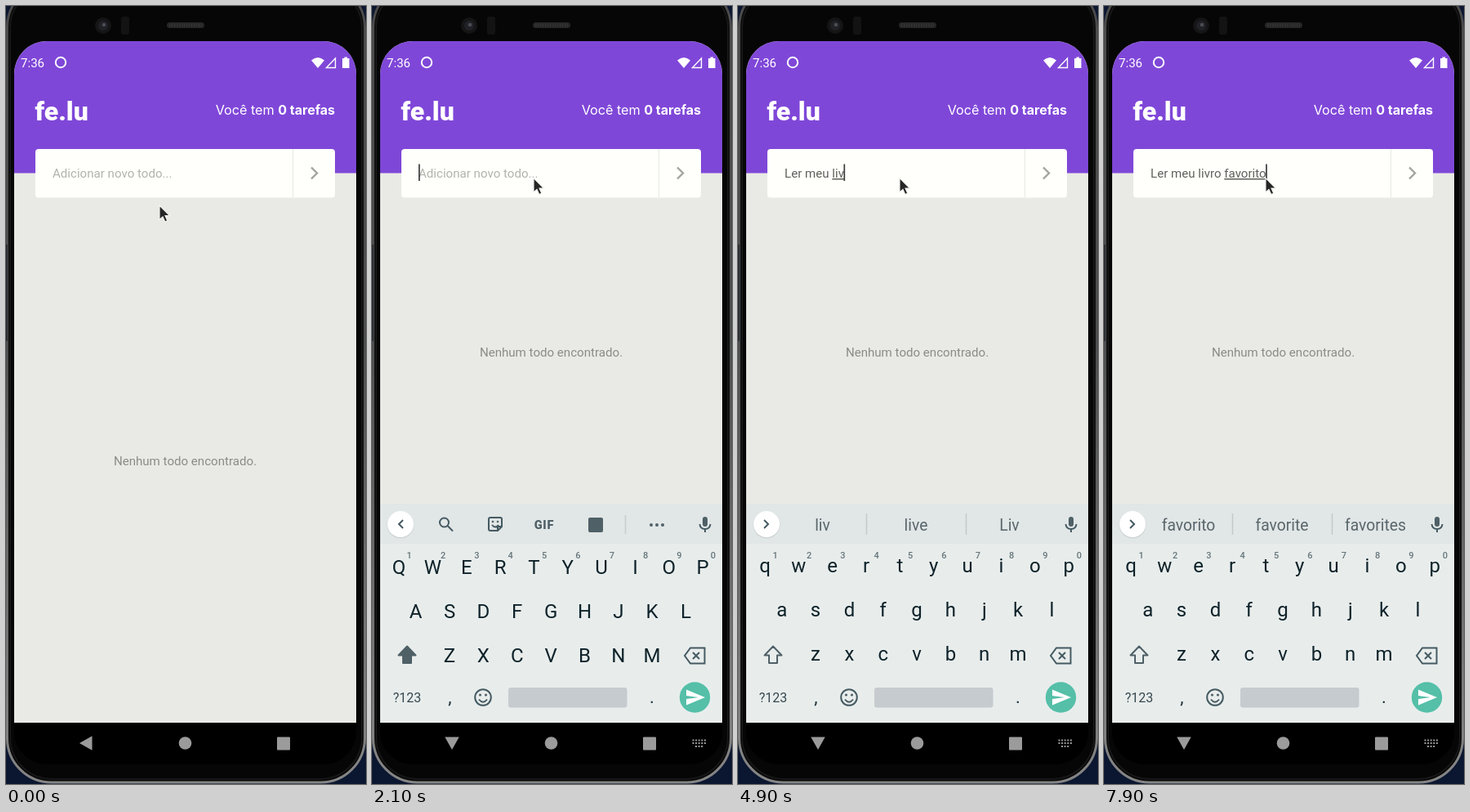
Recreate the animation shown at these times as an HTML page. Size 441 by 952 pixels, loop 8000 ms.

```html
<!DOCTYPE html>
<html lang="pt-BR">
<head>
<meta charset="utf-8">
<title>Lista de tarefas</title>
<style>
  html, body { margin: 0; width: 100%; height: 100%; overflow: hidden; background: #0b1630; }
  svg { display: block; width: 441px; height: 952px; font-family: Roboto, "Noto Sans", sans-serif; }
  text { white-space: pre; }
  .field { font-size: 15.1px; }
  .mid { text-anchor: middle; }
  .line { fill: none; stroke: #455a62; stroke-width: 2; }
  .icon { fill: #4f6067; }
  #letters { font-size: 24px; fill: #0e2229; }
  #digits { font-size: 11px; font-weight: 500; fill: #66757a; }
  #words { font-size: 19.3px; fill: #59666b; }
</style>
</head>
<body>
<svg viewBox="0 0 441 952">
  <defs>
    <linearGradient id="rim" x1="0" y1="0" x2="0" y2="1">
      <stop offset="0" stop-color="#4a4a4a"/>
      <stop offset=".45" stop-color="#4c4d4e"/>
      <stop offset="1" stop-color="#858585"/>
    </linearGradient>
    <clipPath id="screen"><rect x="10" y="43" width="419" height="885" rx="40"/></clipPath>
  </defs>

  <!-- phone body -->
  <rect x="1.500" y="-28" width="438" height="978" rx="54" fill="#060606" stroke="url(#rim)" stroke-width="3"/>
  <rect x="5" y="-24" width="431" height="970" rx="51" fill="none" stroke="#171717" stroke-width="2"/>
  <path d="M1 292V410" stroke="#2a2d31" stroke-width="2"/>
  <circle cx="119" cy="24" r="10" fill="#151516"/>
  <circle cx="119" cy="24" r="6" fill="#202126"/>
  <circle cx="120" cy="23" r="2.300" fill="#4a4c52"/>
  <rect x="141" y="13" width="10" height="22" rx="3" fill="#131314"/>
  <rect x="197" y="20" width="46" height="7" rx="3.500" fill="#262626"/>
  <path d="M200 23.500H240" stroke="#343434" stroke-width="4" stroke-dasharray="1.5 1.5"/>

  <g clip-path="url(#screen)">
    <rect x="10" y="43" width="419" height="885"/>
    <rect x="10" y="43" width="419" height="834" fill="#e9eae5"/>
    <rect x="10" y="43" width="419" height="161.500" fill="#7f47d8"/>

    <!-- status bar -->
    <g fill="#fff">
      <text x="18" y="75" font-size="15.1">7:36</text>
      <circle cx="67" cy="69" r="6.200" fill="none" stroke="#fff" stroke-width="2"/>
      <path d="M374 66.500Q382 59.500 390 66.500L382 76Z"/>
      <path d="M403.500 64V75.500H392.500Z" fill="none" stroke="#fff" stroke-width="1.400"/>
      <path d="M414.500 62.500h3.500v1.500h2.500v12h-8.500v-12h2.500Z"/>
    </g>

    <!-- header -->
    <text x="35.500" y="139.500" font-size="32" font-weight="900" fill="#fff">fe.lu</text>
    <text x="403" y="132.500" text-anchor="end" font-size="16" fill="#fff" font-family="Inter, sans-serif"><tspan font-size="16.200">Você tem </tspan><tspan font-weight="700">0 tarefas</tspan></text>

    <!-- input -->
    <rect x="36" y="175" width="367" height="59.500" rx="4" fill="#fffffb"/>
    <path d="M351.500 175V234" stroke="#e8e8e3"/>
    <path d="M374 197.500L381 204.500L374 211.500" fill="none" stroke="#a3a39f" stroke-width="2.400"/>
    <text id="hint" class="field" x="57" y="210" fill="#b2b2ae">Adicionar novo todo...</text>
    <text id="typed" class="field" x="57" y="210" fill="#5f5f5d"><tspan id="done"></tspan><tspan id="open" text-decoration="underline"></tspan></text>
    <rect id="caret" y="193.500" width="1.700" height="20.500" fill="#3b3b3b"/>

    <text id="empty" class="field mid" x="219.500" fill="#8b8b88">Nenhum todo encontrado.</text>

    <!-- keyboard -->
    <g id="keyboard">
      <rect id="panel" x="10" y="610" width="419" height="299" fill="#fbfbf6"/>
      <g id="keys">
        <rect x="10" y="609" width="419" height="268" fill="#e8edec"/>
        <rect x="10" y="609" width="419" height="49" fill="#e1e6e6"/>
        <circle cx="35" cy="635" r="16.500" fill="#cfd5d5"/>
        <circle cx="35" cy="634" r="16" fill="#fff"/>
        <path id="arrow" class="line"/>

        <g id="tools">
          <circle class="line" cx="88.500" cy="632" r="5.500"/>
          <path class="line" d="M92.500 636L99 642.500"/>
          <path class="line" d="M145 626H157Q159 626 159 628V637L154 642H145Q143 642 143 640V628Q143 626 145 626ZM147 635Q151 640 155 635M154 642V637H159"/>
          <circle class="icon" cx="148" cy="631" r="1.300"/>
          <circle class="icon" cx="154" cy="631" r="1.300"/>
          <text class="mid icon" x="211" y="639.500" font-size="14.500" font-weight="900" letter-spacing=".8">GIF</text>
          <rect class="icon" x="265" y="626" width="18" height="18" rx="2"/>
          <path d="M310.500 623V646" stroke="#c7cdce" stroke-width="1.500"/>
          <path d="M342 635H357" stroke="#4f6067" stroke-width="4" stroke-linecap="round" stroke-dasharray="0 7"/>
        </g>

        <g id="words">
          <path id="bars" d="M157.500 621V647M279.500 621V647" stroke="#c3cacb" stroke-width="1.500"/>
          <text class="mid" x="103.500" y="641.500"></text>
          <text class="mid" x="218" y="641.500"></text>
          <text class="mid" x="332.500" y="641.500"></text>
        </g>

        <rect class="icon" x="405" y="625" width="6" height="12" rx="3"/>
        <path class="line" d="M401.500 634Q402 640 408 640Q414 640 414.500 634M408 640V644"/>

        <g id="letters"></g>
        <g id="digits"></g>

        <path id="shift" d="M43 783.500L53.500 794.500H48V804H38V794.500H32.500Z" stroke="#4f6067" stroke-width="2" stroke-linejoin="round"/>
        <path class="line" d="M390 785.500H407.500V804.500H390L383 795ZM393 791L401 799M401 791L393 799"/>
        <text class="mid" x="43" y="852" font-size="16" fill="#37484f">?123</text>
        <text class="mid" x="95.500" y="853" font-size="22" fill="#1d3037">,</text>
        <text class="mid" x="343" y="853" font-size="22" fill="#1d3037">.</text>
        <circle class="line" cx="136" cy="846" r="9.800"/>
        <path class="line" d="M131 848.500Q136 855 141 848.500"/>
        <circle class="icon" cx="132.500" cy="843" r="1.600"/>
        <circle class="icon" cx="139.500" cy="843" r="1.600"/>
        <rect x="167" y="834" width="145.500" height="24.500" rx="3" fill="#c6cbcf"/>
        <circle cx="395.500" cy="846" r="18.700" fill="#55bfa8"/>
        <path d="M385 836.500L408 846L385 855.500V848L400 846L385 844Z" fill="#fff"/>
      </g>
    </g>

    <!-- navigation bar -->
    <rect id="nav" x="10" y="877" width="419" height="32"/>
    <g id="navIcons" fill="#9b9b9b">
      <path id="back" d="M-8 0L7.500 -8.700V8.700Z"/>
      <circle cx="219.500" cy="902" r="7.800"/>
      <rect x="332" y="894.500" width="16" height="16" rx="1"/>
      <path id="navKeys" d="M392.500 898.500H409M392.500 902H409M396 906H406" fill="none" stroke="#9b9b9b" stroke-width="2" stroke-dasharray="2 1.600"/>
    </g>
  </g>

  <path id="mouse" d="M0 0V17.500L4 13.800L6.800 20L9.800 18.700L7 12.600H12.500Z" fill="#262626" stroke="#f4f4f0" stroke-width="1.100"/>
</svg>

<script>
const LOOP = 8000;
const $ = id => document.getElementById(id);
const attr = (el, values) => { for (const k in values) el.setAttribute(k, values[k]); };

// [time, finished text, underlined text, suggestions; omitted = unchanged]
const typing = [
  [0, "", "", ""],
  [2500, "", "L", "L I Later"],
  [3200, "", "Le"],
  [3300, "", "Ler", "Ler Let Left"],
  [3600, "Ler ", "", ""],
  [3700, "Ler ", "m", "m my me"],
  [3800, "Ler ", "me"],
  [4000, "Ler ", "meu", "meu mew menu"],
  [4100, "Ler meu ", "", ""],
  [4300, "Ler meu ", "l", "l la I"],
  [4500, "Ler meu ", "li"],
  [4800, "Ler meu ", "liv", "li like lines"],
  [4900, "Ler meu ", "liv", "liv live Liv"],
  [5300, "Ler meu ", "livr", "livr live Liver"],
  [5400, "Ler meu ", "livro", "livro livros Livro"],
  [5800, "Ler meu livro ", "", ""],
  [6200, "Ler meu livro ", "f", "f for first"],
  [6500, "Ler meu livro ", "fa", "fa family fault"],
  [6600, "Ler meu livro ", "fav", "fav favorite favor"],
  [6900, "Ler meu livro ", "favo", "favo favorite favor"],
  [7000, "Ler meu livro ", "favor", "favor favorite favors"],
  [7100, "Ler meu livro ", "favori", "favori favorite favorites"],
  [7400, "Ler meu livro ", "favorit", "favorit favorite favorites"],
  [7900, "Ler meu livro ", "favorito", "favorito favorite favorites"]
];
typing.forEach((row, i) => { if (row[3] === undefined) row[3] = typing[i - 1][3]; });

// [time, x, y]
const mouse = [[0, 188, 244], [200, 190, 237], [300, 195, 226], [400, 198, 218], [800, 198, 214], [900, 198, 210.5]];

// [time, offset, opacity of keys, opacity of the bar, turn of the back icon]
const sliding = [[0, 0, 0, 1, 0], [1100, 32, .75, .33, -35], [1200, 8, .94, .7, -70], [1300, 0, 1, 1, -90]];

const at = (rows, t) => rows.filter(row => row[0] <= t).pop();

// letter keys
const keys = [];
function addText(parent, x, y, label) {
  const el = document.createElementNS("http://www.w3.org/2000/svg", "text");
  attr(el, { x, y, class: "mid" });
  el.textContent = label;
  parent.append(el);
  return el;
}
["qwertyuiop", "asdfghjkl", "zxcvbnm"].forEach((row, r) => {
  [...row].forEach((letter, i) => {
    const x = [33, 53.7, 95][r] + i * 41.35, y = 695.3 + r * 54;
    keys.push({ el: addText($("letters"), x, y, letter), letter, y });
    if (!r) addText($("digits"), x + 12.7, 676, (i + 1) % 10);
  });
});
const words = [...document.querySelectorAll("#words text")];

function setCase(upper) {
  for (const key of keys) {
    key.el.textContent = upper ? key.letter.toUpperCase() : key.letter;
    attr(key.el, { y: upper ? key.y : key.y - 2.5 });
  }
  attr($("shift"), { fill: upper ? "#4f6067" : "none" });
}

function caretOn(t) {
  if (t < 2500) return t >= 1100 && !(t >= 1600 && t < 2100);
  return !(t >= 3000 && t < 3200);
}

const show = (id, on) => attr($(id), { visibility: on ? "visible" : "hidden" });

function draw(t) {
  const [, x, y] = at(mouse, t);
  attr($("mouse"), { transform: `translate(${x} ${y})` });

  const open = t >= 1100;
  const [, drop, keyAlpha, navAlpha, turn] = at(sliding, t);
  attr($("keyboard"), { display: open ? "inline" : "none" });
  attr($("panel"), { height: 267 + drop });
  attr($("keys"), { transform: `translate(0 ${drop})`, opacity: keyAlpha });
  attr($("nav"), { opacity: navAlpha });
  attr($("navIcons"), { fill: drop ? "#d4d7d6" : "#9b9b9b" });
  attr($("back"), { transform: `translate(98 902) rotate(${turn})` });
  show("navKeys", open);
  attr($("empty"), { y: open ? 428.5 : 561.5 });
  setCase(t < 2300);

  const [, done, part, list] = at(typing, t);
  const started = t >= 2500;
  $("done").textContent = done;
  $("open").textContent = part;
  show("hint", !started);
  show("tools", !started);
  show("bars", list !== "");
  attr($("arrow"), { d: started ? "M32 629L37 634L32 639" : "M38 629L33 634L38 639" });
  const labels = list.split(" ");
  words.forEach((el, i) => { el.textContent = labels[i] || ""; });

  show("caret", caretOn(t));
  attr($("caret"), { x: 57 + (started ? $("typed").getComputedTextLength() - .5 : 0) });
}

const start = performance.now();
let last = -1;
function tick() {
  const t = Math.max(0, performance.now() - start) % LOOP;
  const step = Math.floor(t / 100);
  if (step !== last) draw(step * 100);
  last = step;
  requestAnimationFrame(tick);
}
tick();
</script>
</body>
</html>
```
